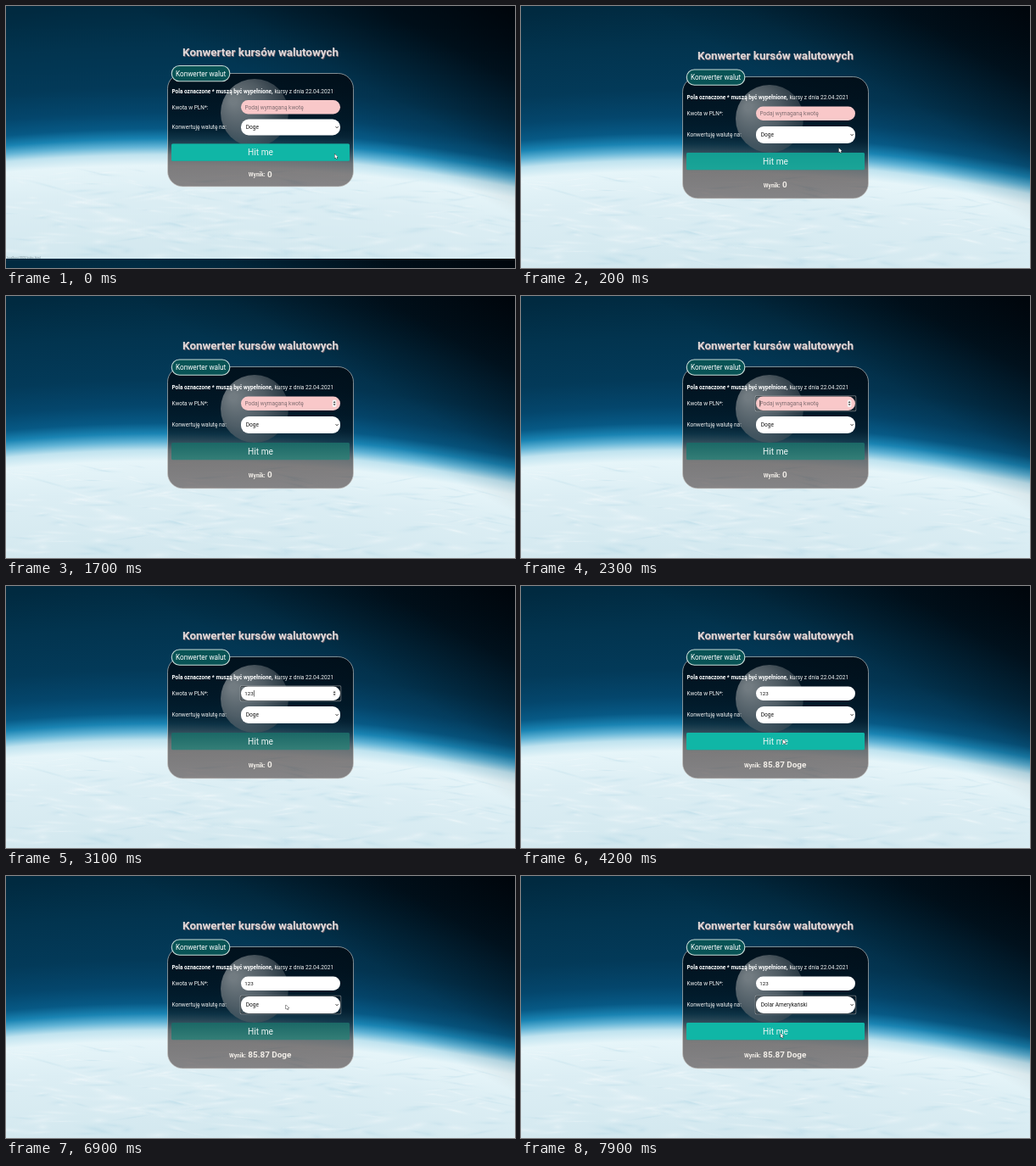
An HTML page with a canvas for the animation above (8 s loop, 600 by 309 pixels).

```html
<!DOCTYPE html>
<html lang="pl">
<head>
<meta charset="utf-8">
<title>Konwerter kursów walutowych</title>
<style>
html, body { margin: 0; width: 100%; height: 100%; overflow: hidden; background: #001722; }
canvas { display: block; width: 600px; height: 309px; }
</style>
</head>
<body>
<canvas id="stage"></canvas>
<script>
const W = 600, H = 309, LOOP = 8000;
const FONT = 'Roboto, "Open Sans", sans-serif';
const scale = Math.max(1, window.devicePixelRatio || 1);
const stage = document.getElementById('stage');
stage.width = W * scale;
stage.height = H * scale;
const ctx = stage.getContext('2d');
ctx.scale(scale, scale);

// Vertical positions: compact page first, then the full-height page
const COMPACT = { title: 54.5, top: 79.5, bottom: 213, legend: 70.5, note: 101, input: 111, select: 133.5, selectH: 19, button: 162.5, result: 198, moon: 126 };
const FULL = { title: 58.5, top: 83.5, bottom: 227, legend: 75, note: 107.5, input: 118.5, select: 142, selectH: 20, button: 173, result: 210.5, moon: 133 };

const CUT = 100;
const CLICK_INPUT = 2300, KEYS = [2600, 2800, 3000], SUBMIT = 3900;
const CLICK_SELECT = 6200, CHOOSE = 7300;

// time, x, y of the pointer
const PATH = [
  [0, 387.5, 174.5], [100, 387.5, 174.5], [650, 243, 95], [1000, 243, 95],
  [1500, 318, 127], [3200, 318, 127], [3700, 309, 181], [4500, 309, 181],
  [5400, 323.5, 142.8], [5800, 323.5, 142.8], [6100, 330, 152],
  [7350, 330, 152], [7700, 306, 185.5], [8000, 306, 185.5]
];

const ease = p => p * p * (3 - 2 * p);
const layoutAt = t => t < CUT ? COMPACT : FULL;

function pointerAt(t) {
  let i = 1;
  while (i < PATH.length - 1 && t > PATH[i][0]) i++;
  const a = PATH[i - 1], b = PATH[i];
  const p = ease(Math.min(1, Math.max(0, (t - a[0]) / (b[0] - a[0]))));
  return { x: a[1] + (b[1] - a[1]) * p, y: a[2] + (b[2] - a[2]) * p };
}

const inside = (p, x, y, w, h) => p.x > x && p.x < x + w && p.y > y && p.y < y + h;

// Share of the last 200 ms spent over the button
function buttonGlow(t) {
  let n = 0;
  for (let i = 0; i < 10; i++) {
    const s = Math.max(0, t - i * 20);
    if (inside(pointerAt(s), 195, layoutAt(s).button, 210, 20)) n++;
  }
  return n / 10;
}

function gradient(c, x0, y0, x1, y1, stops) {
  const g = c.createLinearGradient(x0, y0, x1, y1);
  stops.forEach(([at, color]) => g.addColorStop(at, color));
  return g;
}

function box(x, y, w, h, r, fill, line, width = 1) {
  ctx.beginPath();
  ctx.roundRect(x, y, w, h, r);
  if (fill) { ctx.fillStyle = fill; ctx.fill(); }
  if (line) { ctx.strokeStyle = line; ctx.lineWidth = width; ctx.stroke(); }
}

function text(str, x, y, size, color, weight = 400, align = 'left') {
  ctx.font = `${weight} ${size}px ${FONT}`;
  ctx.textAlign = align;
  ctx.textBaseline = 'alphabetic';
  ctx.fillStyle = color;
  ctx.fillText(str, x, y + size * 0.36);
  return ctx.measureText(str).width;
}

// How far the horizon has curved down at x
const drop = x => 0.00024 * (x - 190) ** 2;

function makeSky() {
  const sky = document.createElement('canvas');
  sky.width = W * scale;
  sky.height = H * scale;
  const c = sky.getContext('2d');
  c.scale(scale, scale);
  const stops = [
    [0, '#012a40'], [0.16, '#02344f'], [0.32, '#033a59'], [0.42, '#04466c'],
    [0.485, '#075985'], [0.525, '#1a84b3'], [0.557, '#62b4d6'], [0.588, '#c0e3ef'],
    [0.63, '#e6f5f9'], [0.75, '#dceef4'], [1, '#d3e8ef']
  ];
  for (let x = 0; x < W; x += 2) {
    const d = drop(x);
    c.fillStyle = gradient(c, 0, d, 0, H + d, stops);
    c.fillRect(x, 0, 2, H);
  }
  // Space darkens towards the upper right
  c.fillStyle = gradient(c, 600, 0, 470, 230, [
    [0, 'rgba(0,3,8,.95)'], [0.3, 'rgba(0,4,10,.72)'], [0.65, 'rgba(0,8,16,.15)'], [0.85, 'rgba(0,8,16,0)']
  ]);
  c.fillRect(0, 0, W, H);

  let seed = 11;
  const rnd = () => (seed = (seed * 16807) % 2147483647) / 2147483647;
  for (let i = 0; i < 260; i++) {
    const x = rnd() * W, depth = rnd();
    const y = 196 + drop(x) + depth * 110;
    const rx = 10 + rnd() * 34, ry = 1.5 + rnd() * 7 * depth;
    const tone = rnd() < 0.6 ? '255,255,255,.3' : '160,206,224,.24';
    const g = c.createRadialGradient(0, 0, 0, 0, 0, 1);
    g.addColorStop(0, `rgba(${tone})`);
    g.addColorStop(1, 'rgba(215,235,242,0)');
    c.save();
    c.translate(x, y);
    c.rotate((rnd() - 0.4) * 0.5);
    c.scale(rx, ry);
    c.fillStyle = g;
    c.fillRect(-1, -1, 2, 2);
    c.restore();
  }
  return sky;
}
const sky = makeSky();

function drawSky(t) {
  if (t >= CUT) {
    ctx.drawImage(sky, 0, 0, W, H);
    return;
  }
  ctx.drawImage(sky, 0, 0, W, 298);
  ctx.drawImage(sky, 0, 0, W * scale, 11 * scale, 0, 298, W, 11);
  text('localhost:5500/index.html', 1, 296.5, 3.4, 'rgba(60,80,90,.6)');
}

function drawPanel(L) {
  ctx.save();
  ctx.beginPath();
  ctx.roundRect(190.5, L.top, 219, L.bottom - L.top, 18);
  ctx.clip();
  ctx.fillStyle = gradient(ctx, 0, L.top, 0, L.bottom, [
    [0, 'rgba(0,3,8,.72)'], [0.5, 'rgba(0,4,9,.68)'], [0.72, 'rgba(26,12,10,.54)'], [1, 'rgba(34,14,12,.48)']
  ]);
  ctx.fillRect(190, L.top, 220, L.bottom - L.top);
  const g = ctx.createRadialGradient(268, L.moon - 14, 4, 284, L.moon - 4, 56);
  g.addColorStop(0, 'rgba(142,149,153,.8)');
  g.addColorStop(0.5, 'rgba(108,117,123,.72)');
  g.addColorStop(1, 'rgba(56,69,78,.55)');
  ctx.fillStyle = g;
  ctx.beginPath();
  ctx.arc(293, L.moon, 40, 0, Math.PI * 2);
  ctx.fill();
  ctx.restore();
  box(190.5, L.top, 219, L.bottom - L.top, 18, null, 'rgba(205,203,200,.7)', 0.9);
  box(195.3, L.legend, 68.5, 18.2, 9, '#085355', '#c9dcd8', 1.1);
  text('Konwerter walut', 229.6, L.legend + 9.1, 8.2, '#fff', 400, 'center');
}

function focusRing(y, h) {
  box(276.4, y - 0.6, 118.2, h + 1.2, 1, null, 'rgba(225,228,230,.45)', 1.4);
  box(276.8, y - 0.2, 117.4, h + 0.4, 1, null, '#15191c', 0.7);
}

function spinner(y) {
  box(384.8, y - 4.3, 4.6, 8.6, 1.5, '#f4f4f4');
  ctx.fillStyle = '#444';
  for (const s of [-1, 1]) {
    ctx.beginPath();
    ctx.moveTo(385.7, y + s * 0.6);
    ctx.lineTo(388.5, y + s * 0.6);
    ctx.lineTo(387.1, y + s * 2.6);
    ctx.fill();
  }
}

function drawInput(t, L, p) {
  const mid = L.input + 8.2;
  const typed = KEYS.filter(k => t >= k).length;
  const focused = t >= CLICK_INPUT && t < SUBMIT;
  if (focused) focusRing(L.input, 16.4);
  box(277, L.input, 117, 16.4, 8.2, typed ? '#fff' : '#f9c8c9');
  if (typed) text('123'.slice(0, typed), 281.3, mid, 6.2, '#111');
  else text('Podaj wymaganą kwotę', 281.5, mid, 6.55, '#806d71');
  if (focused) {
    const last = typed ? KEYS[typed - 1] : CLICK_INPUT;
    if ((t - last) % 1000 < 500) {
      ctx.fillStyle = '#111';
      ctx.fillRect(281.5 + typed * 3.48, mid - 3.8, 0.6, 7.6);
    }
  }
  if (focused || inside(p, 277, L.input, 117, 16.4)) spinner(mid);
}

function drawSelect(t, L) {
  const mid = L.select + L.selectH / 2;
  if (t >= CLICK_SELECT) focusRing(L.select, L.selectH);
  box(277, L.select, 117, L.selectH, 9, '#fff');
  text(t < CHOOSE ? 'Doge' : 'Dolar Amerykański', 282.8, mid, 6.55, '#161616');
  ctx.strokeStyle = '#222';
  ctx.lineWidth = 0.9;
  ctx.beginPath();
  ctx.moveTo(388.6, mid - 0.8);
  ctx.lineTo(390.1, mid + 0.8);
  ctx.lineTo(391.6, mid - 0.8);
  ctx.stroke();
}

function drawButton(t, L) {
  const glow = buttonGlow(t);
  box(195, L.button, 210, 20.2, 1.5, gradient(ctx, 0, L.button, 0, L.button + 20, [[0, '#1b6866'], [1, '#347e77']]));
  ctx.globalAlpha = glow;
  box(195, L.button, 210, 20.2, 1.5, '#10b6a6');
  ctx.globalAlpha = 1;
  text('Hit me', 300, L.button + 10.2, 10.2, '#eef6f5', 400, 'center');
}

function drawResult(t, L) {
  const done = t >= SUBMIT;
  const x = done ? 263 : 285.8;
  text('Wynik:', x, L.result + 0.8, 6.6, '#f3efe9', 700);
  text(done ? '85.87 Doge' : '0', x + 22.3, L.result, 9.9, '#f3efe9', 700);
}

function drawPointer(p, L) {
  // The thin text beam is lost on the field
  if (inside(p, 277, L.input, 117, 16.4)) return;
  ctx.save();
  ctx.translate(p.x, p.y);
  ctx.beginPath();
  [[0, 0], [0, 5], [1.2, 4], [2, 5.8], [2.9, 5.4], [2.1, 3.7], [3.6, 3.6]]
    .forEach(([x, y]) => ctx.lineTo(x, y));
  ctx.closePath();
  ctx.strokeStyle = '#222';
  ctx.lineWidth = 0.9;
  ctx.stroke();
  ctx.fillStyle = '#fff';
  ctx.fill();
  ctx.restore();
}

function draw(t) {
  const L = layoutAt(t), p = pointerAt(t);
  drawSky(t);
  const title = 'Konwerter kursów walutowych';
  text(title, 300.7, L.title + 0.7, 13.4, 'rgba(150,112,116,.8)', 700, 'center');
  text(title, 300, L.title, 13.4, '#ddd8d9', 700, 'center');
  drawPanel(L);
  const w = text('Pola oznaczone * muszą być wypełnione,', 195.5, L.note, 6.45, '#fff', 700);
  text('kursy z dnia 22.04.2021', 195.5 + w + 1.9, L.note, 6.6, '#f2f2f2');
  text('Kwota w PLN*:', 195.5, L.input + 8.2, 6.5, '#f2f2f2');
  text('Konwertuję walutę na:', 195.5, L.select + L.selectH / 2, 6.55, '#f2f2f2');
  drawInput(t, L, p);
  drawSelect(t, L);
  drawButton(t, L);
  drawResult(t, L);
  drawPointer(p, L);
}

const start = performance.now();
function tick() {
  draw((performance.now() - start) % LOOP);
  requestAnimationFrame(tick);
}
tick();
</script>
</body>
</html>
```
